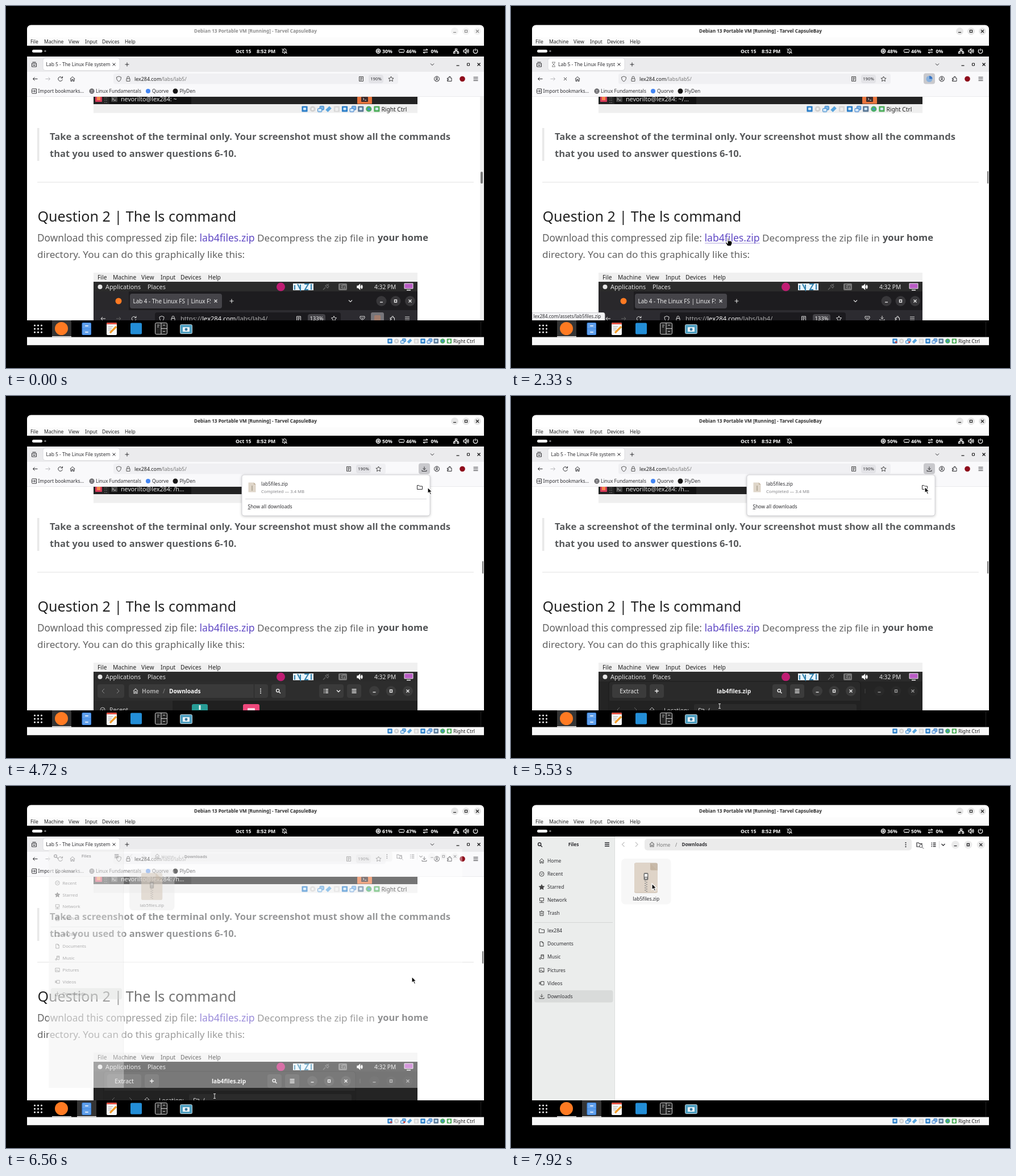
Recreate the animation shown at these times as an HTML page with a canvas. Size 878 by 638 pixels, loop 8000 ms.

```html
<!DOCTYPE html>
<html lang="en">
<head>
<meta charset="utf-8">
<title>Downloading a lab file</title>
<style>
html, body { margin: 0; height: 100%; overflow: hidden; background: #000; }
canvas { display: block; width: 878px; height: 638px; }
</style>
</head>
<body>
<canvas id="stage" width="878" height="638"></canvas>
<script>
const ctx = document.getElementById('stage').getContext('2d');
const LOOP = 8000, INK = '#2e2e32', SITE = 'lex284';
const PURPLE = '#5f48c4', BLUE = '#2c7fc9', ORANGE = '#ff7a22';

// Text is placed by the middle of its capital letters.
function text(s, x, cy, size = 8.5, color = INK, weight = 400, align = 'left') {
  ctx.font = `${weight} ${size}px "Noto Sans", sans-serif`;
  ctx.fillStyle = color;
  ctx.textAlign = align;
  ctx.fillText(s, x, cy + size * .357);
}
function box(x, y, w, h, color, radius = 0, stroke) {
  ctx.beginPath();
  ctx.roundRect(x, y, w, h, radius);
  if (color) { ctx.fillStyle = color; ctx.fill(); }
  if (stroke) { ctx.strokeStyle = stroke; ctx.lineWidth = 1; ctx.stroke(); }
}
function dot(x, y, r, color) { box(x - r, y - r, 2 * r, 2 * r, color, r); }
function path(d, x, y, color = INK, width = 1, fill) {
  ctx.save();
  ctx.translate(x, y);
  const shape = new Path2D(d);
  if (fill) { ctx.fillStyle = fill; ctx.fill(shape); }
  if (width) { ctx.strokeStyle = color; ctx.lineWidth = width; ctx.stroke(shape); }
  ctx.restore();
}
function clipped(x, y, w, h, draw) {
  ctx.save();
  ctx.beginPath();
  ctx.rect(x, y, w, h);
  ctx.clip();
  draw();
  ctx.restore();
}

const ICON = {
  back: 'M4 0H-4M-1-3L-4 0L-1 3',
  next: 'M-4 0H4M1-3L4 0L1 3',
  reload: 'M3.4-1.8A3.8 3.8 0 1 0 3.8 1M4-4.5V-1.5H1',
  close: 'M-2.5-2.5L2.5 2.5M2.5-2.5L-2.5 2.5',
  home: 'M-4 0L0-4L4 0M-3-1V4H-1V1H1V4H3V-1',
  plus: 'M-3.5 0H3.5M0-3.5V3.5',
  down: 'M-3-1.5L0 1.5L3-1.5',
  left: 'M2-4L-2 0L2 4',
  right: 'M-2-4L2 0L-2 4',
  min: 'M-2.5 2H2.5',
  max: 'M-2-2H2V2H-2Z',
  menu: 'M-4-3H4M-4 0H4M-4 3H4',
  shield: 'M0-4.5L4-3Q4 3 0 4.5Q-4 3-4-3Z',
  lock: 'M-3-.5H3V4H-3ZM-2-.5V-2.5Q-2-4.5 0-4.5Q2-4.5 2-2.5V-.5',
  reader: 'M-3.5-4H3.5V4H-3.5ZM-2-2H2M-2 0H2M-2 2H1',
  star: 'M0-4.5L1.4-1.5L4.6-1.2L2.2 1L2.9 4.2L0 2.5L-2.9 4.2L-2.2 1L-4.6-1.2L-1.4-1.5Z',
  save: 'M0-4V1.5M-2.5-1L0 1.5L2.5-1M-4 2V4H4V2',
  puzzle: 'M-4-1.5H-1V-4H1.5V-1.5H3.5V4H-4V2H-2V.5H-4Z',
  user: 'M4.5 0A4.5 4.5 0 1 1-4.5 0A4.5 4.5 0 1 1 4.5 0M1.5-1.2A1.5 1.5 0 1 1-1.5-1.2A1.5 1.5 0 1 1 1.5-1.2M-3 3Q0-.5 3 3',
  folder: 'M-4.5-3.5H-1.5L0-2H4.5V3.5H-4.5Z',
  search: 'M1.8-.8A2.6 2.6 0 1 1-3.4-.8A2.6 2.6 0 1 1 1.8-.8M1.2 1.2L4 4',
  list: 'M-4-3H-2.5M-1-3H4M-4 0H-2.5M-1 0H4M-4 3H-2.5M-1 3H4',
  clock: 'M4 0A4 4 0 1 1-4 0A4 4 0 1 1 4 0M-2-1L0 1L2-1.5',
  net: 'M-3.5-4H3.5V1H-3.5ZM0 1V4M-4 4H4',
  trash: 'M-4-3H4M-3-3V4H3V-3M-1-4.5H1M-1-1V2M1-1V2',
  page: 'M-3-4H1L3-2V4H-3ZM1-4V-2H3',
  music: 'M-1 2.5V-4H3.5V1.5M-1-2H3.5M-1 2.5A1.4 1.4 0 1 1-4 2.5A1.4 1.4 0 1 1-1 2.5M3.5 1.5A1.4 1.4 0 1 1 .8 1.5',
  image: 'M-4-3.5H4V3.5H-4ZM-3 2L-1-.5L1 2H3',
  video: 'M-1.5-3H4V3H-1.5ZM-4-2L-1.5 0L-4 2Z',
  sound: 'M-4-1.5H-2L.5-4V4L-2 1.5H-4ZM2-2Q4 0 2 2M3.5-3.5Q6.5 0 3.5 3.5',
  bell: 'M-4 2.5H4L3 1V-1.5Q3-4 0-4Q-3-4-3-1.5V1ZM-1 4H1M-4.5-4.5L4.5 4.5',
  power: 'M-2-3A3.8 3.8 0 1 0 2-3M0-4.5V-.5',
  lan: 'M-1.5-4H1.5V-1.5H-1.5ZM-4.5 1.5H-2V4H-4.5ZM2 1.5H4.5V4H2ZM0-1.5V0M-3.2 1.5V0H3.2V1.5',
  swap: 'M-4-1.8H3.5M1.5-4L4-1.8M4 1.8H-3.5M-1.5 4L-4 1.8',
  hourglass: 'M-3-4H3M-3 4H3M-2-4V-2L2 2V4M2-4V-2L-2 2V4',
};
const icon = (name, x, y, color = INK, width = 1, fill) => path(ICON[name], x, y, color, width, fill);
const icons = (items, y, color, width) => items.forEach(([name, x]) => icon(name, x, y, color, width));

// Latest entry whose start time has passed.
const at = (steps, t) => steps.filter(s => s[0] <= t).pop();
const CPU = [[0, 30], [1700, 48], [2800, 71], [3800, 50], [5600, 61], [6650, 79], [7700, 36]];
const MEMORY = [[0, 46], [5600, 47], [6650, 50]];
const PROMPT = [[0, '~'], [1300, '~/…'], [3800, '/h…']];
const POINTER = [[500, 838, 300], [1200, 480, 395], [1500, 382, 409], [2650, 382, 409], [3000, 419, 406],
  [3300, 419, 406], [3900, 700, 175], [4300, 742, 161], [5100, 742, 161], [5350, 728, 160],
  [5600, 728, 160], [6200, 714, 336], [7150, 714, 336], [7800, 248, 172], [LOOP, 248, 172]];

function menuBar(xs, y, size) {
  ['File', 'Machine', 'View', 'Input', 'Devices', 'Help'].forEach((s, i) => text(s, xs[i], y, size, '#222'));
}

function statusIcons(x, y, step, busy) {
  const s = step * .36;
  const colors = [BLUE, '#d2d2d2', BLUE, '#58a5df', '#d8d8d8', BLUE, '#3678c8', '#5b7896', '#4aae67', '#4fae5a'];
  colors.forEach((color, i) => {
    const cx = x + i * step;
    if (i === 1 || i === 8) {
      dot(cx, y, s, color);
      dot(cx, y, s * .4, i === 1 ? '#f4f4f4' : '#3f8fd8');
    } else if (i === 2 || i === 6) {
      box(cx - s * .3, y - s, s * 1.4, s * 1.3, '#7cb5e6', 1, color);
      box(cx - s, y - s * .2, s * 1.4, s * 1.2, '#cfe6f8', 1, color);
    } else if (i === 3) {
      path(`M${-s * .7} ${s * .7}L${s * .6} ${-s * .6}`, cx, y, color, s * 1.1);
    } else {
      box(cx - s, y - s, 2 * s, 2 * s, color, 1);
      box(cx - s * .5, y - s * .5, s, s * (i === 4 ? 1.2 : .9), i === 4 ? '#eee' : '#cfe8fa', 1);
    }
  });
  if (busy) [0, 2].forEach(i => dot(x + i * step + 2, y + 2, 1.8, '#d6453d'));
}

function frame(t) {
  const active = t > 1950;
  box(37, 33.5, 804, 564, '#fff', [7, 7, 0, 0]);
  box(37, 55, 804, 15, '#fcfcfc');
  text('Debian 13 Portable VM [Running] - Tarvel CapsuleBay', 439, 44.5, 8.2, active ? '#2d2d2d' : '#8c8c8c', 700, 'center');
  ['min', 'max', 'close'].forEach((name, i) => {
    dot(789.5 + i * 20, 44.5, 6.5, active ? '#e6e6e6' : '#f3f3f3');
    icon(name, 789.5 + i * 20, 44.5, active ? '#222' : '#888', 1.2);
  });
  menuBar([43, 67, 110, 139, 169, 209], 62.5, 8.6);

  box(37, 70, 804, 19, '#000');
  box(46, 77, 18, 5, '#fff', 2.5);
  dot(69, 79.5, 1.7, '#777');
  text('Oct 15', 404, 79.5, 8.7, '#fff', 700);
  text('8:52 PM', 441, 79.5, 8.7, '#fff', 700);
  icon('bell', 490, 79.5, '#fff');
  dot(655, 79.5, 4.3, '#fff');
  box(653, 77.5, 4, 4, null, 0, '#111');
  box(691.5, 76.5, 9, 5, null, 1, '#fff');
  path('M-3 3V1M0 3V1M3 3V1', 696, 80, '#fff');
  icon('swap', 738, 79.5, '#fff', 1.2);
  text(at(CPU, t)[1] + '%', 662, 79.5, 8.7, '#fff', 700);
  text(at(MEMORY, t)[1] + '%', 704, 79.5, 8.7, '#fff', 700);
  text('0%', 747.5, 79.5, 8.7, '#fff', 700);
  icons([['lan', 792], ['sound', 809], ['power', 826]], 79.5, '#fff', 1.2);

  box(37, 583.5, 804, 14, '#f8f8f8');
  statusIcons(675.5, 590.5, 11.6, (t > 2180 && t < 2490) || (t > 6400 && t < 6600));
  path('M0-3V2M-2 0L0 2.5L2 0', 780, 590.5, '#fff', 1.3);
  text('Right Ctrl', 787, 591, 8.65, '#222');
}

function dash(filesOpen) {
  box(37, 554, 804, 29.5, '#000');
  for (let i = 0; i < 9; i++) dot(50.5 + i % 3 * 6, 563 + Math.floor(i / 3) * 6, 1.5, '#fff');
  box(filesOpen ? 125 : 81, 554, 34, 29, '#343434');
  box(81, 582, 34, 1.5, '#eee');
  if (filesOpen) box(125, 582, 34, 1.5, '#eee');
  dot(97.5, 568.5, 11.5, ORANGE);

  box(133.5, 558, 16.5, 22, '#3584e4', 2);
  box(134.5, 559, 14.5, 9.5, '#62a0ea', 1);
  box(134.5, 569.5, 14.5, 9.5, '#62a0ea', 1);
  [563, 574].forEach(y => box(139, y, 6, 1.5, '#fff', 1));

  box(177, 558, 18, 22, '#f7f7f7', 2);
  box(177, 558, 18, 3, '#e34f42', [2, 2, 0, 0]);
  path('M-6-3H2M-6 0H0M-6 3H-1', 186, 568, '#aaa');
  path('M-4 6L7-5', 187, 570, '#f29a24', 3.2);
  box(219, 558.5, 20, 20, '#238ed7', 2);

  box(262.5, 558.5, 21, 20, '#242424', 2, '#d0d0d0');
  path('M0-10V10M0 0H10M-7-6H-3M-7-3H-4M3-6H7M3 5H7', 273, 568.5, '#d0d0d0');
  box(306.5, 561.5, 21, 16, '#4d9ec0', 2, '#c8d4da');
  box(311, 566, 12, 8, '#e9f1f5', 1);
  dot(317, 570, 2.4, '#3578a0');
  box(835, 555, 1, 28, '#222');
}

function browserBars(t) {
  const loading = t >= 2180 && t < 2480, saved = t >= 2180;
  box(37, 89, 804, 27, '#ebebed');
  box(65, 91.5, 135, 22, '#fff', 4, '#dcdce0');
  path('M-4-2H4V4H-4ZM-3-4H3M-1.5 0V1.5H1.5V0', 49.5, 103);
  if (loading) icon('hourglass', 75, 103, '#888');
  clipped(68, 92, 115.5, 21, () => text('Lab 5 - The Linux File system', loading ? 83 : 70.5, 103, 8.45));
  icons([['close', 190], ['plus', 213], ['down', 750]], 103);
  icons([['min', 795], ['close', 832]], 103, '#111', 1.2);
  box(811.5, 101, 4, 4, null, 0, '#111');

  box(37, 116, 804, 44, '#f9f9fb');
  icon('back', 51.5, 128.5);
  icon('next', 73.5, 128.5, '#b8b8bc');
  icon(loading ? 'close' : 'reload', 95.5, 128.5);
  icon('home', 117, 128.5);
  const shift = saved ? -22 : 0;
  box(189, 119, 501 + shift, 18.5, '#f0f0f3', 4);
  icon('shield', 198.5, 128.5, '#555');
  icon('lock', 215, 128.5, '#555');
  text(SITE + '.com', 226, 128.5, 8.85, '#222');
  const siteWidth = ctx.measureText(SITE + '.com').width;
  text('/labs/lab5/', 226 + siteWidth, 128.5, 8.85, '#777');
  icon('reader', 625 + shift, 128.5, '#444');
  box(638 + shift, 121, 26, 15, '#e3e3e7', 4);
  text('190%', 651 + shift, 128.5, 7.7, INK, 400, 'center');
  icon('star', 677.5 + shift, 128.5, '#444');
  if (saved) {
    if (t < 5560) box(726, 118.5, 20, 19, '#c9c9cd', 4);
    if (loading) {
      dot(736, 128.5, 5.5, '#8ab1dc');
      path('M0 0V-5.5A5.5 5.5 0 0 1 5.5 0Z', 736, 128.5, '', 0, '#3675c8');
    } else icon('save', 736, 128.5);
  }
  icon('user', 758, 128.5);
  icon('puzzle', 780.5, 128.5);
  dot(803, 128.5, 4.8, '#8e0b1b');
  icon('menu', 826.5, 128.5);

  path('M-4-3V3M-4-4H4V4H-4M-3 0H2M0-2L2 0L0 2', 49.5, 150);
  text('Import bookmarks…', 56.5, 150, 8.42);
  path('M4 0A4 4 0 1 1-4 0A4 4 0 1 1 4 0M-4 0H4M0-4Q-3.5 0 0 4Q3.5 0 0-4', 151, 150);
  text('Linux Fundamentals', 158, 150, 8.42);
  dot(250, 150, 4, '#4285f4');
  text('Quorve', 257, 150, 8.42);
  dot(298, 150, 4.5, '#181717');
  text('PlyDen', 305.5, 150, 8.42);
  box(37, 159.5, 804, 1, '#dedee2');
}

function upperShot(t) {
  box(154, 160, 570, 14, '#232323');
  box(182, 160, 144, 13, '#111');
  box(157, 160, 12, 9, '#d8395b', 1);
  box(160, 160, 6, 6, '#f48a49');
  for (let i = 0; i < 6; i++) dot(174 + i % 2 * 3, 162 + Math.floor(i / 2) * 4, .7, '#999');
  box(185, 160, 11, 9, '#444', 1);
  path('M-3-2L-1 0L-3 2M0 2H3', 190, 164, '#ddd');
  text(`nevorilto@${SITE}: ${at(PROMPT, t)[1]}`, 202, 164.5, 10.7, '#e4e4e4');
  box(618, 160, 26, 12.5, '#e9753d', 1);
  box(625, 160, 12, 9, '#3b2b2b', 1);
  path('M-3-2L-1 0L-3 2M0 2H3', 631, 164, '#ddd');
  box(154, 173, 570, 15.5, '#efefef');
  statusIcons(525.5, 181.5, 14.1);
  text('Right Ctrl', 660.5, 182, 10.2, '#222');
}

function windowButtons(xs, color, fill) {
  ['min', 'max', 'close'].forEach((name, i) => {
    dot(xs[i], 520, 9, fill);
    icon(name, xs[i], 520, color, 1.3);
  });
}

function innerBrowser(t) {
  box(154, 503, 570, 33, '#1d1c1f');
  box(154, 503, 62, 33, '#29282b');
  dot(198, 520, 5.5, ORANGE);
  box(218, 507, 162, 26, '#454449', 4);
  clipped(218, 507, 142, 26, () => text('Lab 4 - The Linux FS | Linux FS', 223.5, 520, 9.9, '#eee'));
  icons([['close', 369], ['plus', 397], ['down', 606]], 520, '#ddd', 1.2);
  windowButtons([660.5, 685.5, 711], '#eee', '#38373a');
  box(154, 536, 570, 18, '#2c2b30');
  box(262, 540, 327, 24, '#1b1a1e', 4);
  icon('back', 171, 551, '#ddd');
  icon('next', 198, 551, '#666');
  icons([['reload', 225], ['shield', 274], ['lock', 294], ['reader', 515], ['star', 577], ['puzzle', 680], ['menu', 706]], 551, '#ddd');
  text('https://', 307, 551, 11.1, '#aaa');
  const x = 307 + ctx.measureText('https://').width;
  text(SITE + '.com', x, 551, 11.1, '#f2f2f2');
  text('/labs/lab4/', x + ctx.measureText(SITE + '.com').width, 551, 11.1, '#aaa');
  box(531, 543, 31, 16, '#434247', 4);
  text('133%', 546.5, 551, 9.5, '#eee', 400, 'center');
  path('M-4-3H4V0Q0 6-4 0ZM-2-1L0 1L2-1', 627, 550, '#ddd');
  if (t < 1300) {
    box(642, 540, 23, 20, '#77757a', 3);
    box(648, 545, 11, 12, '#a27c6d', 2);
  } else icon('save', 653, 550, '#ddd');
}

function innerFiles() {
  box(154, 503, 570, 34, '#2d2d2d');
  box(161, 508, 47, 24, '#3a3a3a', 4);
  icons([['left', 171], ['right', 197]], 520, '#888');
  box(216, 508, 245, 24, '#3a3a3a', 4);
  icon('home', 228, 520, '#bbb', 1.3);
  text('Home', 239, 520, 10.3, '#aaa', 700);
  text('/', 276, 520, 10.3, '#888');
  text('Downloads', 287, 520, 10.1, '#fff', 700);
  box(436, 508, 1, 24, '#292929');
  [-3.5, 0, 3.5].forEach(d => dot(448, 520 + d, 1.1, '#eee'));
  box(467, 508, 25, 24, '#3a3a3a', 4);
  icon('search', 479, 520, '#eee', 1.4);
  box(551, 508, 43, 24, '#3a3a3a', 4);
  box(600, 508, 25, 24, '#3a3a3a', 4);
  icons([['list', 563], ['down', 585], ['menu', 612.5]], 520, '#eee', 1.4);
  windowButtons([648, 677.5, 707], '#eee', '#3b3b3b');
  box(154, 537, 139, 17, '#292929');
  box(293, 537, 431, 17, '#202020');
  icon('clock', 170, 553, '#bbb');
  text('Recent', 182, 553.5, 10.3, '#ccc');
  box(327, 543, 28, 14, '#279c96', 3);
  path('M0-4V4', 341, 549, '#e4f2ef', 3);
  box(417, 543, 29, 14, '#ee477b', 3);
  box(425, 550, 13, 5, '#ffd5e1', 1);
}

function innerArchive() {
  box(154, 503, 570, 51, '#242424');
  windowButtons([648, 677.5, 707], '#999', '#292929');
  path('M0-4V4', 623, 520, '#444');
  box(172, 503, 443, 51, '#2a2a2a', [5, 5, 0, 0], '#1a1a1a');
  box(178, 508, 60, 24, '#3b3b3b', 4);
  text('Extract', 208, 520, 10.3, '#eee', 400, 'center');
  [[244, 'plus'], [460, 'search'], [491, 'menu']].forEach(([x, name]) => {
    box(x, 508, 25, 24, '#3b3b3b', 4);
    icon(name, x + 12.5, 520, '#eee', 1.4);
  });
  text('lab4files.zip', 392, 520, 10.2, '#f2f2f2', 700, 'center');
  windowButtons([539, 568.5, 598], '#eee', '#3b3b3b');
  box(172, 537, 442, 17, '#222');
  icons([['left', 189], ['right', 219]], 553, '#666');
  icon('home', 248, 553, '#bbb');
  text('Location:', 269, 554, 10.3, '#ccc');
  box(322, 543, 286, 20, '#2b2b2b', 3);
  icon('folder', 335, 554, '#ccc');
  text('/', 346, 554, 10.3, '#ccc');
  path('M-2-4H2M0-4V4M-2 4H2', 367, 546.5, '#ddd');
}

function lowerShot(t) {
  box(154, 470, 570, 16, '#f0f0f0');
  menuBar([161, 188, 238, 272, 307, 355.5], 478, 10.3);
  box(154, 486, 570, 18, '#2b2b2b');
  dot(165.5, 495, 4, '#e5e5e5');
  text('Applications', 175, 495, 10.8, '#e4e4e4');
  text('Places', 249, 495, 10.8, '#e4e4e4');
  dot(483.5, 495, 7.5, '#c01d73');
  box(505, 489, 36, 12, '#e8f3fa');
  path('M-15 5V-3M-10-5L-5 5V-4M2-5H9L3 5H9M14-5V5', 523, 495, '#3181ad', 2);
  path('M-5 5L-1 1M-1-2L3 2L5-1L2-4ZM2-2L5-5', 563, 495, '#666', 1.2);
  box(585, 489, 15, 12, '#777', 2);
  text('En', 592.5, 495, 9.5, '#242424', 400, 'center');
  icon('sound', 622, 495, '#fff', 1.4, '#fff');
  text('4:32 PM', 648, 495, 10.2, '#e4e4e4');
  box(701, 489, 15, 9, '#ba5cc5', 0, '#eee');
  box(705, 500, 7, 1.5, '#eee');
  if (t < 2700) innerBrowser(t);
  else if (t < 5200) innerFiles();
  else innerArchive();
}

function page(t) {
  box(37, 160, 804, 394, '#fff');
  upperShot(t);
  box(55, 215, 3.5, 58, '#e8e8e8');
  text('Take a screenshot of the terminal only. Your screenshot must show all the commands', 77, 230.5, 16.57, '#585a5c', 700);
  text('that you used to answer questions 6-10.', 77, 260, 16.57, '#585a5c', 700);
  box(55, 310, 768, 1, '#e4e4e4');
  text('Question 2 | The ls command', 55.5, 371, 25.1, '#222');
  text('Download this compressed zip file:', 55, 408.5, 17.25, '#626262');
  text('lab4files.zip', 340.5, 408.5, 17.6, PURPLE);
  if (t > 1450 && t < 3400) box(341, 417.5, 97, 1, '#a79cdd');
  text('Decompress the zip file in', 442, 408.5, 17.15, '#626262');
  text('your home', 654, 408.5, 16.46, '#505254', 700);
  text('directory. You can do this graphically like this:', 55, 438, 17.15, '#626262');
  lowerShot(t);
  if (t < 700) {
    box(834, 160, 7, 394, '#f0f0f0');
    box(835, 292, 4, 21, '#777', 2);
  } else box(838, 291, 2, 22, '#777', 1);
  if (t > 1500 && t < 2700) {
    box(37, 540.5, 128, 14, '#f3f3f5', [0, 3, 0, 0], '#d2d2d6');
    text(SITE + '.com/assets/lab5files.zip', 39.5, 547.5, 8.2);
  }
}

function downloadPanel(t) {
  const ready = t > 3400;
  ctx.save();
  ctx.shadowColor = '#0004';
  ctx.shadowBlur = 5;
  ctx.shadowOffsetY = 1;
  box(415, 139, 331, 72, '#fff', 4);
  ctx.restore();
  box(415, 139, 331, 72, null, 4, '#d4d4d8');
  ctx.globalAlpha = ready ? 1 : .5;
  path('M-6.5-8.5H3L6.5-5V8.5H-6.5Z', 433, 161, '', 0, '#dfd6c9');
  path('M3-8.5V-5H6.5Z', 433, 161, '', 0, '#bfb09b');
  path('M0-3V6', 433, 161, '#aaa08f', 1.5);
  text('lab5files.zip', 449, 155, 8.5);
  text('Completed — 3.4 MB', 449, 168, 7.7, '#858589');
  ctx.globalAlpha = 1;
  icon('folder', 728, 161);
  box(421, 181, 319, 1, '#d8d8dc');
  text('Show all downloads', 425.5, 195, 8.45);
  box(425.5, 199, 4.5, .8, INK);
}

function fileManager(t) {
  box(37, 89, 804, 465, '#fff');
  box(37, 89, 145.5, 465, '#ebedec');
  box(182, 89, 1, 465, '#dcdedd');
  icon('search', 51, 103.5, INK, 1.5);
  text('Files', 110, 103, 8.3, INK, 700, 'center');
  icon('menu', 169, 103, INK, 1.4);
  box(41, 360, 138.5, 21.5, '#d9dbda', 4);
  box(41, 240, 138, 1, '#d4d6d5');
  const places = [['home', 'Home'], ['clock', 'Recent'], ['star', 'Starred'], ['net', 'Network'], ['trash', 'Trash'],
    ['folder', SITE], ['page', 'Documents'], ['music', 'Music'], ['image', 'Pictures'], ['video', 'Videos'], ['save', 'Downloads']];
  places.forEach(([name, label], i) => {
    const y = 132 + i * 23.1 + (i > 4 ? 7.7 : 0);
    icon(name, 54, y, '#444', 1, name === 'star' ? '#444' : null);
    text(label, 64, y, 8.5);
  });
  icons([['left', 197.5], ['right', 221]], 103, '#c8c8c8', 1.3);
  box(235, 93, 470, 20.5, '#ebebeb', 5);
  icon('home', 248, 103, '#777', 1.2);
  text('Home', 256, 103.5, 8.5, '#777');
  text('/', 289, 103.5, 8.5, '#777');
  text('Downloads', 300.5, 103.5, 8.1, INK, 700);
  [-3.5, 0, 3.5].forEach(d => dot(694.5, 103.5 + d, 1.1, INK));
  icon('folder', 718.5, 103.5, INK, 1.2);
  dot(722, 106, 3, '#fff');
  icon('search', 722, 106.5, INK, .9);
  icon('list', 743.5, 103.5, INK, 1.5);
  box(753, 97, 1, 13, '#ddd');
  icon('down', 760.5, 103.5, INK, 1.3);
  ['min', 'max', 'close'].forEach((name, i) => {
    dot(782 + i * 22.4, 103.5, 7, '#ebebeb');
    icon(name, 782 + i * 22.4, 103.5, INK, 1.3);
  });

  const selected = t < 7500;
  box(194, 128, 87.5, 80.5, selected ? '#e4e4e4' : '#f7f7f7', 7);
  box(217, 135.5, 41, 53, '#c8baaa', 3);
  path('M3 0H28L41 13V49Q41 52 38 52H3Q0 52 0 49V3Q0 0 3 0Z', 217, 135.5, '', 0, '#dfd4c8');
  path('M28 0L41 13H30Q28 13 28 11Z', 217, 135.5, '', 0, '#c5b5a2');
  box(233.5, 153, 8, 13, '#777', 2);
  box(235, 155, 5, 5, '#f4f4f4', 1);
  box(236, 161, 3, 3, '#ddd', 1);
  for (let y = 167; y < 187; y += 2) box(y % 4 === 3 ? 235 : 237.5, y, 2.5, 1.2, '#888');
  text('lab5files.zip', 237.7, 199, 8.5, INK, 400, 'center');
  if (selected && t > 6790) {
    box(698, 535, 140, 16.5, '#e9e9e9', 6);
    text('“lab5files.zip” selected  (3.6 MB)', 704, 543.5, 8.5);
  }
}

function pointer(t) {
  if (t < POINTER[0][0]) return;
  const i = Math.min(POINTER.findLastIndex(p => p[0] <= t), POINTER.length - 2);
  const [t0, x0, y0] = POINTER[i], [t1, x1, y1] = POINTER[i + 1];
  const u = (t - t0) / (t1 - t0), ease = u * u * (3 - 2 * u);
  const x = x0 + (x1 - x0) * ease, y = y0 + (y1 - y0) * ease;
  const hand = t > 1450 && t < 3350;
  path(hand ? 'M-1 0Q1-1 1 1V5Q6 4 7 7V10L5 14H-1L-5 8Q-4 6-2 8L-1 9Z'
            : 'M0 0V11L2.6 8.7L4.5 13L6.5 12L4.6 8H8Z', x, y, '#fff', 1.2, '#000');
}

function draw(t) {
  ctx.clearRect(0, 0, 878, 638);
  frame(t);
  clipped(37, 89, 804, 465, () => {
    if (t < 6700) {
      browserBars(t);
      page(t);
      if (t >= 2480 && t < 5560) downloadPanel(t);
    }
    if (t > 6480) {
      const shown = Math.min(1, (t - 6480) / 220), scale = .85 + .15 * shown;
      ctx.save();
      ctx.globalAlpha = shown;
      ctx.translate(439 * (1 - scale), 321.5 * (1 - scale));
      ctx.scale(scale, scale);
      fileManager(t);
      ctx.restore();
    }
    pointer(t);
  });
  dash(t > 6560);
}

function tick(now) {
  draw(now % LOOP);
  requestAnimationFrame(tick);
}
requestAnimationFrame(tick);
</script>
</body>
</html>
```
